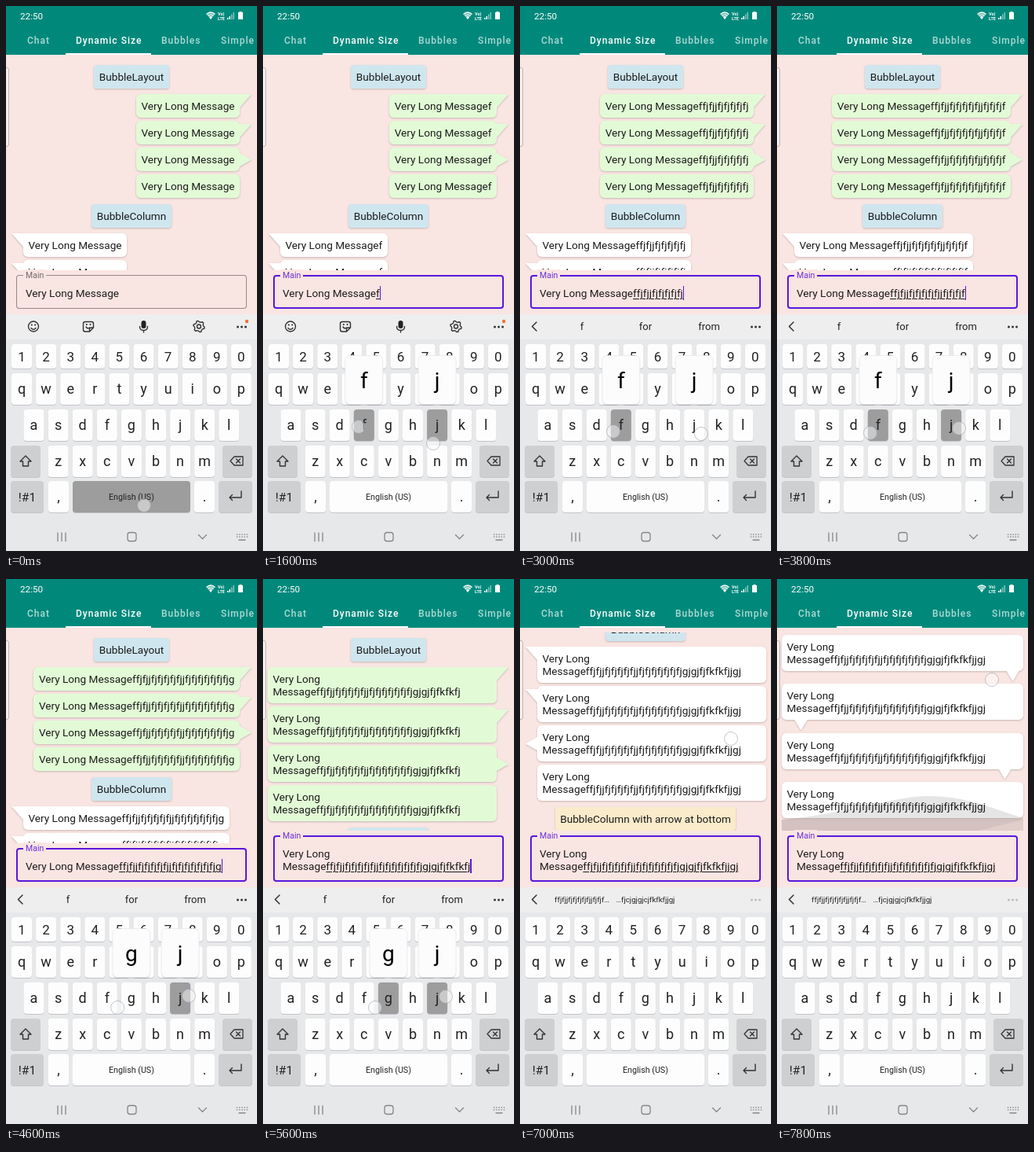
Recreate the animation shown at these times as an HTML page. Size 320 px wide and 693 px high, loop 8 s.

```html
<!DOCTYPE html>
<html lang="en">
<head>
<meta charset="utf-8">
<title>Dynamic Size</title>
<style>
html, body { margin: 0; width: 100%; height: 100%; overflow: hidden; }
body { position: relative; background: #f9e5e2; color: #1c1b1b; font: 13.6px/16px Roboto, sans-serif; }
#top, #keyboard { position: absolute; left: 0; top: 0; }
#edge { position: absolute; left: -4px; top: 78px; width: 6px; height: 99px; border: 1px solid #bdb4b3; border-radius: 3px; background: #f7efee; }
#page { position: absolute; top: 68px; width: 320px; height: 317px; display: flex; flex-direction: column; }
#view { position: relative; flex: 1; overflow: hidden; }
#list { display: flex; flex-direction: column; padding-top: 7px; }
.chip, .bubble { position: relative; flex: none; box-sizing: border-box; padding: 7px 6.5px; border-radius: 6px; filter: drop-shadow(0 1px .8px #0003); }
.chip { align-self: center; margin: 8px 0 3px; border-radius: 4px; background: #cfe6ef; }
.chip:first-child { margin-top: 0; }
.chip.sand { background: #faebcb; }
.bubble { margin-top: 4px; max-width: 292px; background: var(--fill); }
.sent { --fill: #e2fbd6; align-self: flex-end; margin-right: 22px; }
.got { --fill: #fff; align-self: flex-start; margin-left: 22px; }
.wide { --fill: #fff; align-self: flex-start; margin: 4px 6px 12.4px; max-width: 308px; }
.bubble::after { position: absolute; background: var(--fill); }
.corner::after, .offset::after, .middle::after { content: ""; left: calc(100% - 6px); width: 21px; height: 17px; top: 0; clip-path: polygon(0 0, 100% 0, 6px 100%, 0 100%); }
.offset::after { top: 4px; }
.middle::after { top: calc(50% - 8px); clip-path: polygon(0 0, 6px 0, 100% 50%, 6px 100%, 0 100%); }
.got::after { left: auto; right: calc(100% - 6px); transform: scaleX(-1); }
.below::after { content: ""; left: var(--x); top: calc(100% - 1px); width: 17px; height: 14px; clip-path: polygon(0 0, 100% 0, 50% 100%); }
#glow { position: absolute; left: 0; bottom: 0; }
#field { position: relative; flex: none; box-sizing: border-box; width: 294px; margin: 6px 0 0 13px; padding: 15px 12px 12px; border-radius: 4px; box-shadow: inset 0 0 0 1px #938887; }
#field.focus { box-shadow: inset 0 0 0 2px #5b16dc; }
#label { position: absolute; left: 9px; top: -7px; padding: 0 3px; background: #f9e5e2; color: #716968; font-size: 10.5px; }
.focus #label { color: #6a2fd9; }
#typed { text-decoration: underline; text-decoration-thickness: 1px; text-underline-offset: 2px; }
.caret #typed::after { content: ""; position: absolute; width: 1.5px; height: 18px; margin-top: -1px; background: #5b16dc; }
svg { display: block; font-family: Roboto, sans-serif; }
</style>
</head>
<body>
<svg id="top" width="320" height="62">
  <rect width="320" height="62" fill="#00897b"/>
  <g fill="#fff">
    <text x="18" y="17" font-size="11.7">22:50</text>
    <path d="M255.500 10.500Q261 5.500 266.500 10.500L261 17Z" opacity=".45"/>
    <path d="M255.500 10.500Q261 5.500 266.500 10.500M257.500 12.500Q261 9.500 264.500 12.500" fill="none" stroke="#fff" stroke-width="1.200"/>
    <path d="M259 14L261 12.800L263 14L261 17Z"/>
    <g font-size="5.500" font-weight="700"><text x="270" y="12">Vo)</text><text x="270" y="17.500">LTE</text></g>
    <path d="M282 17v-2h1.500v2zM284.500 17v-4h1.500v4z"/>
    <path d="M287 17v-6.500h1.500v6.500zM289.500 17v-9h1.500v9z" opacity=".5"/>
    <path d="M297.500 8V7h3v1h1.500v9h-6V8z"/>
    <g font-size="12" font-weight="500" letter-spacing="1">
      <text x="89" y="48">Dynamic Size</text>
      <g opacity=".68"><text x="27" y="48">Chat</text><text x="198" y="48">Bubbles</text><text x="274" y="48">Simple</text></g>
    </g>
    <rect x="76" y="60" width="109" height="2"/>
  </g>
</svg>
<div id="edge"></div>
<div id="page">
  <div id="view">
    <div id="list"></div>
    <svg id="glow" width="320" height="48">
      <path d="M6 34C80 28 150 5 188 4C235 3 265 16 314 32V48H6Z" fill="#000" opacity=".1"/>
      <path d="M6 34H314L258 48H6Z" fill="#000" opacity=".06"/>
    </svg>
  </div>
  <div id="field"><span id="label">Main</span>Very Long Message<span id="typed"></span></div>
</div>
<svg id="keyboard" width="320" height="693"></svg>

<script>
const STEP = 200, LOOP = 8000;
const SUFFIX = 'ffjfjj' + 'fj'.repeat(5) + 'j' + 'fj'.repeat(7) + 'gjgjfjfkfkfjjgj';
const HOLDS = 'lbrlbrlrlbrlbrlbrlblrbr'; // left, right or both keys down
const FIRST_TOUCH = 7, LAST_TOUCH = 29;
const $ = id => document.getElementById(id);

// Piecewise linear value from [step, value] points
function along(points, s) {
  if (s <= points[0][0]) return points[0][1];
  for (let i = 1; i < points.length; i++) {
    const [a, from] = points[i - 1], [b, to] = points[i];
    if (s <= b) return from + (to - from) * (s - a) / (b - a);
  }
  return points[points.length - 1][1];
}

const COUNT = [[7, 0], [8, 1], [15, 16], [23, 32], [28, 43], [30, 46]];
const SCROLL = [[31, 0], [32, 40], [33, 130], [34, 215], [35, 267], [36, 340], [37, 435], [38, 500], [39, 523]];
const LEFT = [[[8, 122], [15, 119], [21, 119], [22, 142], [28, 143]], [[8, 535], [15, 541], [23, 545]]];
const RIGHT = [[[8, 217], [15, 231], [23, 233]], [[8, 556], [15, 544], [23, 530], [28, 531]]];
const SWIPE = { 32: [266, 290], 33: [268, 205], 35: [269, 203], 36: [271, 140], 38: [272, 190], 39: [274, 128] };

// Message list
const chip = (text, cls = '') => `<div class="chip ${cls}">${text}</div>`;
const bubble = (cls, x = 0) =>
  `<div class="bubble ${cls}" style="--x:${x}px">Very Long Message<span class="tail"></span></div>`;
const group = side => ['corner', 'offset', 'middle', ''].map(tail => bubble(side + ' ' + tail)).join('');
$('list').innerHTML = chip('BubbleLayout') + group('sent') + chip('BubbleColumn') + group('got') +
  chip('BubbleColumn with arrow at bottom', 'sand') +
  [286, 16, 276].map(x => bubble('wide below', x)).join('') + bubble('wide');
const tails = document.querySelectorAll('.tail');

// Keyboard
const text = (x, y, size, s, extra = '') =>
  `<text x="${x}" y="${y}" font-size="${size}" text-anchor="middle" ${extra}>${s}</text>`;
const plate = (x, y, w, h, fill, id = '') =>
  `<rect x="${x}" y="${y + 1}" width="${w}" height="${h}" rx="4" fill="#c3c4c7"/>` +
  `<rect ${id && `id="${id}"`} x="${x}" y="${y}" width="${w}" height="${h}" rx="4" fill="${fill}"/>`;
const WHITE = '#fdfdfd', GREY = '#cecfd1', DOWN = '#9d9d9e';
const keyX = {};
function row(chars, x, y, h, size = 18) {
  return [...chars].map((c, i) => {
    const cx = x + i * 31.1;
    keyX[c] = cx;
    return plate(cx - 13, y, 26, h, WHITE, 'key-' + c) + text(cx, y + h / 2 + 6, size, c);
  }).join('');
}
const dots = (fill, id) =>
  `<g id="${id}" fill="${fill}"><circle cx="295.500" cy="408" r="1.500"/><circle cx="300.500" cy="408" r="1.500"/><circle cx="305.500" cy="408" r="1.500"/></g>`;
const line = (d, color = '#333', w = 1.4) =>
  `<path d="${d}" fill="none" stroke="${color}" stroke-width="${w}" stroke-linecap="round" stroke-linejoin="round"/>`;

const cogTeeth = Array.from({ length: 24 }, (_, i) => {
  const a = (i + .5) * Math.PI / 12, r = i % 4 < 2 ? 7.2 : 5.6;
  return (246 + r * Math.cos(a)).toFixed(1) + ' ' + (407.5 + r * Math.sin(a)).toFixed(1);
}).join('L');
const tools = `<g id="tools">
  ${line('M28.500 407.500a6.500 6.500 0 1 0 13 0a6.500 6.500 0 1 0 -13 0M32 409.500q3 3.500 6 0')}
  <circle cx="32.800" cy="405.500" r="1"/><circle cx="37.200" cy="405.500" r="1"/>
  ${line('M101 401.500h8q2.500 0 2.500 2.500v5l-5 5h-5.500q-2.500 0-2.500-2.500v-7.500q0-2.500 2.500-2.500M111.500 409h-3q-2 0-2 2v3M102 408q2 3 4.500 1')}
  <circle cx="102.800" cy="405" r="1"/><circle cx="107.500" cy="405" r="1"/>
  <rect x="172.500" y="400" width="6" height="10" rx="3"/>
  ${line('M170.500 407.500q0 5 5 5t5-5M175.500 412.500v2.500')}
  ${line('M' + cogTeeth + 'Z')}${line('M243.500 407.500a2.500 2.500 0 1 0 5 0a2.500 2.500 0 1 0 -5 0')}
  <circle cx="307" cy="401" r="2.200" fill="#e8743b"/></g>`;
const words = `<g id="words">${text(79, 412, 13, 'f')}${text(160, 412, 13, 'for')}${text(241, 412, 13, 'from')}</g>`;
const guesses = `<g id="guesses">${text(79, 411, 9.8, SUFFIX.slice(0, 22) + '…')}${text(160, 411, 9.7, '…fjcjgjgjcjfkfkfjjgj')}</g>`;
const popup = id => `<g id="${id}"><rect x="-24" y="446" width="48" height="62" rx="6" fill="#0002"/>
  <rect x="-24" y="444.500" width="48" height="62" rx="6" fill="#fcfcfc" stroke="#e2e2e3" stroke-width=".6"/>${text(0, 486, 28, '')}</g>`;
const touch = id => `<circle id="${id}" r="8.500" fill="#fff" fill-opacity=".45" stroke="#8f9aa5" stroke-opacity=".55"/>`;

$('keyboard').innerHTML = `
  <rect y="392" width="320" height="301" fill="#e7e8ea"/>
  <rect y="392" width="320" height="32" fill="#eeeeef"/>
  <g fill="#222">
    ${tools}${words}${guesses}${line('M21 402l-5.500 5.500l5.500 5.500', '#333', 1.5).replace('<path', '<path id="back"')}${dots('#333', 'more')}
    ${row('1234567890', 20, 430, 31, 17)}${row('qwertyuiop', 20, 467, 40)}
    ${row('asdfghjkl', 35.5, 513, 40)}${row('zxcvbnm', 66.6, 559, 40)}
    ${plate(6, 559, 38, 40, GREY)}${plate(276, 559, 38, 40, GREY)}
    ${plate(6, 604, 42, 40, GREY)}${text(27, 630, 15.5, '!#1')}
    ${plate(54, 604, 26, 40, WHITE)}${text(67, 630, 18, ',')}
    ${plate(85, 604, 150, 40, WHITE, 'space')}${text(160, 628, 10.7, 'English (US)')}
    ${plate(240, 604, 26, 40, WHITE)}${text(253, 630, 18, '.')}
    ${plate(271, 604, 43, 40, GREY)}
  </g>
  ${line('M25 572l7 7h-3.500v6h-7v-6h-3.500Z')}
  ${line('M291 573h11v11h-11l-5-5.500ZM293.500 576l5 5M298.500 576l-5 5', '#333', 1.3)}
  ${line('M300 617v8h-15M288.500 621.500l-3.500 3.500l3.500 3.500')}
  ${line('M66 670v10.500M71 670v10.500M76 670v10.500', '#858688', 1.3)}
  <rect x="155" y="669.500" width="11" height="11" rx="3" fill="none" stroke="#858688" stroke-width="1.300"/>
  ${line('M245.500 672.500l5 5l5-5', '#858688', 1.3)}
  ${line('M294.500 672h13M294.500 675h13', '#858688', 1.6).replace('<path', '<path stroke-dasharray=".2 3"')}
  ${line('M297 679h8', '#858688', 1.4)}
  ${popup('popLeft')}${popup('popRight')}
  ${touch('touchLeft')}${touch('touchRight')}`;

const show = (id, on) => { $(id).style.display = on ? '' : 'none'; };
const place = (id, at) => {
  show(id, at);
  if (at) $(id).setAttribute('transform', `translate(${at[0]} ${at[1]})`);
};
const paint = (id, fill) => $(id).setAttribute('fill', fill);
function setPopup(id, letter) {
  place(id, letter && [keyX[letter], 0]);
  if (letter) $(id).querySelector('text').textContent = letter;
}

function caretOn(t) {
  if (t < STEP) return false;
  if (t < 1400) return (t - 200) % 1000 < 500;
  return t < 6100 || (t - 6100) % 1000 < 500;
}

function render(s) {
  const typed = SUFFIX.slice(0, Math.round(along(COUNT, s)));
  $('typed').textContent = typed;
  tails.forEach(tail => { tail.textContent = typed; });
  $('list').style.transform = `translateY(${-along(SCROLL, s)}px)`;
  show('glow', s === 39);
  $('field').className = (s > 0 ? 'focus ' : '') + (caretOn(s * STEP) ? 'caret' : '');

  show('tools', s < 9);
  show('back', s >= 9);
  show('words', s >= 9 && s < 31);
  show('guesses', s >= 31);
  paint('more', s < 31 ? '#333' : '#bcbcbe');

  const touching = s >= FIRST_TOUCH && s <= LAST_TOUCH;
  const switched = s === 26 || s === 27;
  const left = s < 22 || switched ? 'f' : 'g', right = switched ? 'k' : 'j';
  const hold = touching ? HOLDS[s - FIRST_TOUCH] : '';
  for (const c of 'fgjk') {
    const down = c === left && /[lb]/.test(hold) || c === right && /[rb]/.test(hold);
    paint('key-' + c, down ? DOWN : WHITE);
  }
  paint('space', s === 0 ? DOWN : WHITE);

  const popping = s >= FIRST_TOUCH && s <= LAST_TOUCH + 1;
  setPopup('popLeft', popping && left);
  setPopup('popRight', popping && s > FIRST_TOUCH && right);
  const finger = path => path.map(points => along(points, s));
  place('touchLeft', touching ? finger(LEFT) : s === 0 ? [176, 635] : SWIPE[s]);
  place('touchRight', touching && s > FIRST_TOUCH && finger(RIGHT));
}

const start = performance.now();
let shown = -1;
function tick() {
  const s = Math.floor((performance.now() - start) % LOOP / STEP);
  if (s !== shown) render(shown = s);
  requestAnimationFrame(tick);
}
tick();
</script>
</body>
</html>
```
